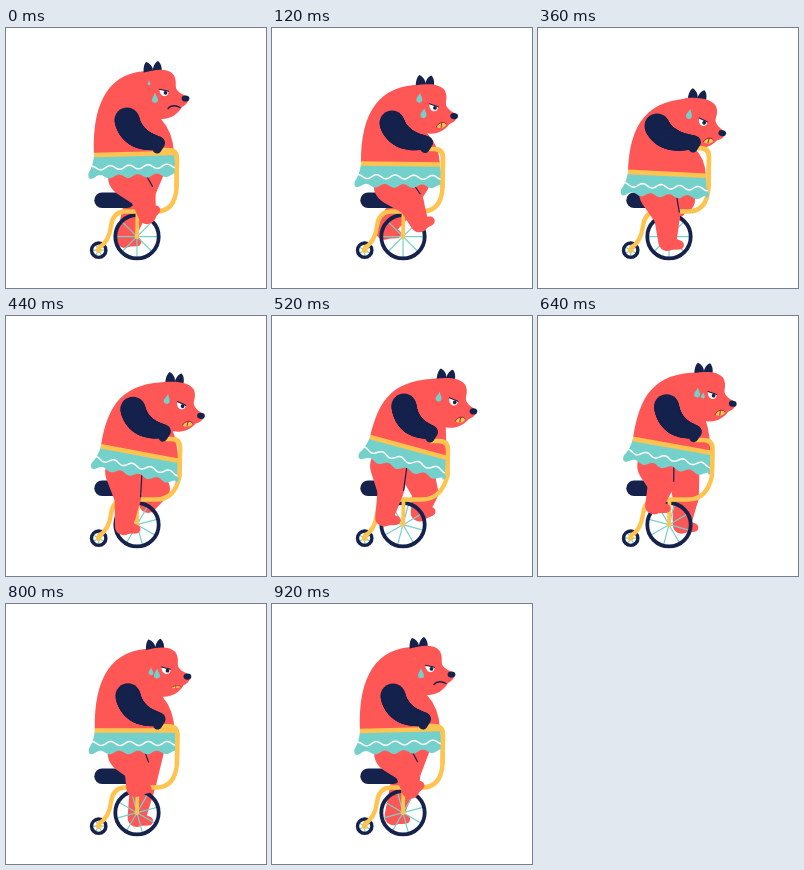
Recreate the animation shown at these times as an HTML page with a canvas. Size 260 by 260 pixels, loop 960 ms.

```html
<!DOCTYPE html>
<html lang="en">
<head>
<meta charset="utf-8">
<title>Bear on a bike</title>
<style>
html, body { margin: 0; width: 100%; height: 100%; overflow: hidden; background: #fff; }
canvas { display: block; width: 260px; height: 260px; }
</style>
</head>
<body>
<canvas id="stage"></canvas>
<script>
const LOOP = 960, STEP = 40, TAU = 2 * Math.PI;
const CORAL = '#ff5656', NAVY = '#14224c', YELLOW = '#ffc450', TEAL = '#74d0ca';

// Three poses; every moment is a blend of them.
const REST = { head: [150, 65, 0], waist: [88, 127, 168, 125], arm: [121, 92, 151, 120],
  bar: [171, 122], hips: [122, 149, 142, 143] };
const SQUAT = { head: [157, 93, 14], waist: [90, 144, 168, 148], arm: [119, 98, 155, 119],
  bar: [171, 120], hips: [121, 165, 141, 165] };
const LEAN = { head: [173.5, 85, 10], waist: [98, 121, 175, 142], arm: [132, 90, 158, 121],
  bar: [176, 125], hips: [118, 150, 147, 160] };

const canvas = document.getElementById('stage');
const g = canvas.getContext('2d');
const dpr = window.devicePixelRatio || 1;
canvas.width = canvas.height = Math.round(260 * dpr);

const clamp = v => Math.max(0, Math.min(1, v));
const mix = (a, b, u) => a + (b - a) * u;
const rad = deg => deg * Math.PI / 180;

function ease(t, from, to) {
  return (1 - Math.cos(Math.PI * clamp((t - from) / (to - from)))) / 2;
}

function blend(squat, lean) {
  const pose = {};
  for (const part in REST) {
    pose[part] = REST[part].map((v, i) =>
      v + squat * (SQUAT[part][i] - v) + lean * (LEAN[part][i] - v));
  }
  return pose;
}

function fill(color, d) {
  g.fillStyle = color;
  g.fill(d instanceof Path2D ? d : new Path2D(d));
}

function line(color, width, d, cap = 'round') {
  g.strokeStyle = color;
  g.lineWidth = width;
  g.lineCap = cap;
  g.lineJoin = 'round';
  g.stroke(new Path2D(d));
}

function oval(color, x, y, rx, ry = rx) {
  g.fillStyle = color;
  g.beginPath();
  g.ellipse(x, y, rx, ry, 0, 0, TAU);
  g.fill();
}

// Hull of two circles.
function limb(color, x1, y1, r1, x2, y2, r2) {
  const dist = Math.hypot(x2 - x1, y2 - y1) || 1;
  const dir = Math.atan2(y2 - y1, x2 - x1);
  const a = Math.acos(Math.max(-1, Math.min(1, (r1 - r2) / dist)));
  const p = new Path2D();
  p.arc(x1, y1, r1, dir + a, dir - a + TAU);
  p.arc(x2, y2, r2, dir - a, dir + a);
  p.closePath();
  fill(color, p);
}

// The ankle follows the pedal; the knee bends forward as the leg shortens.
function leg(hx, hy, hr, angle, crease) {
  const ax = 130 + 18 * Math.cos(angle), ay = 199 + 15 * Math.sin(angle);
  const bend = Math.max(0, 75 - Math.hypot(ax - hx, ay - hy)) * 0.15;
  const kx = (hx + ax) / 2 + bend, ky = (hy + ay) / 2 - bend * 0.3;
  const tilt = -rad(45) * Math.max(0, Math.cos(angle + rad(45))) ** 4;
  limb(CORAL, hx, hy, hr, kx, ky, 13);
  limb(CORAL, kx, ky, 13, ax, ay, 9);
  limb(CORAL, ax, ay + 1, 7, ax + 12 * Math.cos(tilt), ay + 3 + 12 * Math.sin(tilt), 4.5);
  if (crease) {
    const a = Math.atan2(ky - hy, kx - hx) - Math.PI / 2;
    const c = Math.cos(a), s = Math.sin(a);
    line(NAVY, 1.2, `M${hx + 17 * c} ${hy + 17 * s}L${kx + 13 * c} ${ky + 13 * s}`);
  }
}

function wheel(x, y, r, rim, spokes, turn) {
  for (let i = 0; i < spokes; i++) {
    const a = turn + i * TAU / spokes;
    line(TEAL, 1.2, `M${x} ${y}L${x + r * Math.cos(a)} ${y + r * Math.sin(a)}`);
  }
  g.strokeStyle = NAVY;
  g.lineWidth = rim;
  g.beginPath();
  g.arc(x, y, r, 0, TAU);
  g.stroke();
}

function drop(t, x, y, fall, birth, life) {
  const p = (t - birth + LOOP) % LOOP / life;
  if (p >= 1) return;
  const size = Math.min(1, 2.5 * Math.sin(Math.PI * p));
  g.save();
  g.translate(x, y + fall * p);
  g.scale(size, size);
  fill(TEAL, 'M0-5C1-2 3 0 3 2A3 3 0 0 1-3 2C-3 0-1-2 0-5Z');
  g.restore();
}

function wave(x0, x1, y, amp, turns) {
  const points = [];
  for (let u = 0; u <= 1; u += 1 / 64) {
    points.push(`${mix(x0, x1, u)} ${y - amp * Math.cos(u * turns * TAU)}`);
  }
  return points.join('L');
}

function skirt([lx, ly, rx, ry]) {
  const w = Math.hypot(rx - lx, ry - ly);
  g.save();
  g.translate(lx, ly);
  g.rotate(Math.atan2(ry - ly, rx - lx));
  fill(TEAL, `M${w} 0Q${w + 1} 12 ${w + 4} 19Q${w + 4} 22 ${w + 1} 22L` +
    wave(w + 1, -4, 22, 1.8, 4.5) + 'Q-7 23-6 18Q-1 11 0 0Z');
  line('#fff', 1.5, 'M' + wave(-3, w + 2, 13, 2, 4.5));
  line(YELLOW, 4.6, `M0 0L${w} 0`, 'butt');
  g.restore();
}

function head(t, [x, y, turn], open) {
  g.save();
  g.translate(x, y);
  g.rotate(rad(turn));
  g.translate(-150, -65);
  fill(NAVY, 'M138 46C137 41 138 36 140 34C144 35 147 39 147 42C147 39 149 34 152 33C155 35 157 41 155 47Z');
  fill(CORAL, 'M136 45C150 41 161 40 167 46C172 53 168 58 171 62C174 66 179 67 182 69' +
    'C183 74 180 77 176 79C172 86 165 91 156 91L130 95L120 58Z');
  oval(NAVY, 179.5, 70.5, 3.9, 3.1);
  fill('#fff', 'M153.5 61.5L162.5 63.5C163 70 153.5 70 153.5 61.5Z');
  oval(NAVY, 159.5, 64.8, 1.9);
  line(NAVY, 1.1, 'M153.5 61.3L162.5 63.3');
  if (open > 0.25) {
    g.translate(168, 81);
    g.scale(0.8, 0.8 * open);
    fill(YELLOW, 'M-6 3C-4-4 4-5 6-2C5 4-2 5-6 3Z');
    line('#8f2437', 1.1, 'M-6 3C-4-4 4-5 6-2M0-3L0 3');
    g.scale(1.25, 1.25 / open);
    g.translate(-168, -81);
  } else {
    line(NAVY, 1.3, 'M162 80.5C165 77 170 77 174 79.5');
  }
  drop(t, 143, 54, 13, 900, 960);
  drop(t, 149, 65, 9, 580, 720);
  g.restore();
}

function body([lx, ly, rx, ry], [hx, hy, turn]) {
  const c = Math.cos(rad(turn)), s = Math.sin(rad(turn));
  const at = (x, y) => [hx + x * c - y * s, hy + x * s + y * c];
  const [tx, ty] = at(-4, -22), [nx, ny] = at(5, 26);
  const tilt = Math.atan2(ry - ly, rx - lx), rise = 0.67 * (ly - ty);
  fill(CORAL, `M${lx} ${ly}C${lx - 1 + rise * Math.sin(tilt)} ${ly - rise * Math.cos(tilt)} ` +
    `${tx - 0.7 * (tx - lx)} ${ty - 1} ${tx} ${ty}L${nx} ${ny}` +
    `Q${rx - 1} ${(ny + ry) / 2 - 4} ${rx} ${ry}Z`);
}

function arm([sx, sy, hx, hy]) {
  const wx = hx + 2, wy = hy - 5;
  const cx = (sx + hx) / 2 - 10, cy = (sy + hy) / 2 + 7;
  for (let u = 0; u <= 1; u += 1 / 40) {
    oval(NAVY, mix(mix(sx, cx, u), mix(cx, wx, u), u),
      mix(mix(sy, cy, u), mix(cy, wy, u), u), mix(12.5, 6.5, u * u));
  }
  limb(NAVY, wx, wy, 6, hx, hy + 1, 4.5);
}

function draw(t) {
  const squat = ease(t, 0, 240) * (1 - ease(t, 350, 510));
  const lean = ease(t, 360, 500) * (1 - ease(t, 500, 870));
  const p = blend(squat, lean);
  const [bx, by] = p.bar, [nx, ny, fx, fy] = p.hips;
  const turn = t / LOOP * TAU;
  const pedal = turn - rad(40) + rad(20) * Math.sin(turn - 0.4 * TAU);

  g.setTransform(dpr, 0, 0, dpr, 0, 0);
  g.fillStyle = '#fff';
  g.fillRect(0, 0, 260, 260);

  leg(fx, fy, 16, pedal + Math.PI, false);
  wheel(131, 208.7, 21.7, 3.8, 8, turn);
  wheel(92.7, 222.2, 7.2, 3.4, 6, turn * 2);

  const grip = `M${p.arm[2]} ${by}L${bx - 9} ${by}Q${bx} ${by} ${bx} ${by + 9}L${bx - 0.5} 160`;
  line(YELLOW, 4.4, grip + 'Q169 183.5 150 183.5L118 183.5Q107 184 105 198Q103 214 93 219.5');
  line(YELLOW, 3.8, 'M131.5 184L131 208');
  oval(YELLOW, 131, 208.7, 2.4);
  oval(YELLOW, 92.7, 222.2, 2.8);
  limb(NAVY, 96, 172.3, 7.7, 121, 172.3, 7.7);

  leg(nx, ny, 20, pedal, true);
  body(p.waist, p.head);
  skirt(p.waist);
  head(t, p.head, clamp(5 * (squat + lean)));
  line(YELLOW, 4.4, grip, 'butt');
  arm(p.arm);
}

const start = performance.now();
function tick() {
  const t = (performance.now() - start) % LOOP;
  draw(Math.floor(t / STEP) * STEP);
  requestAnimationFrame(tick);
}
tick();
</script>
</body>
</html>
```
